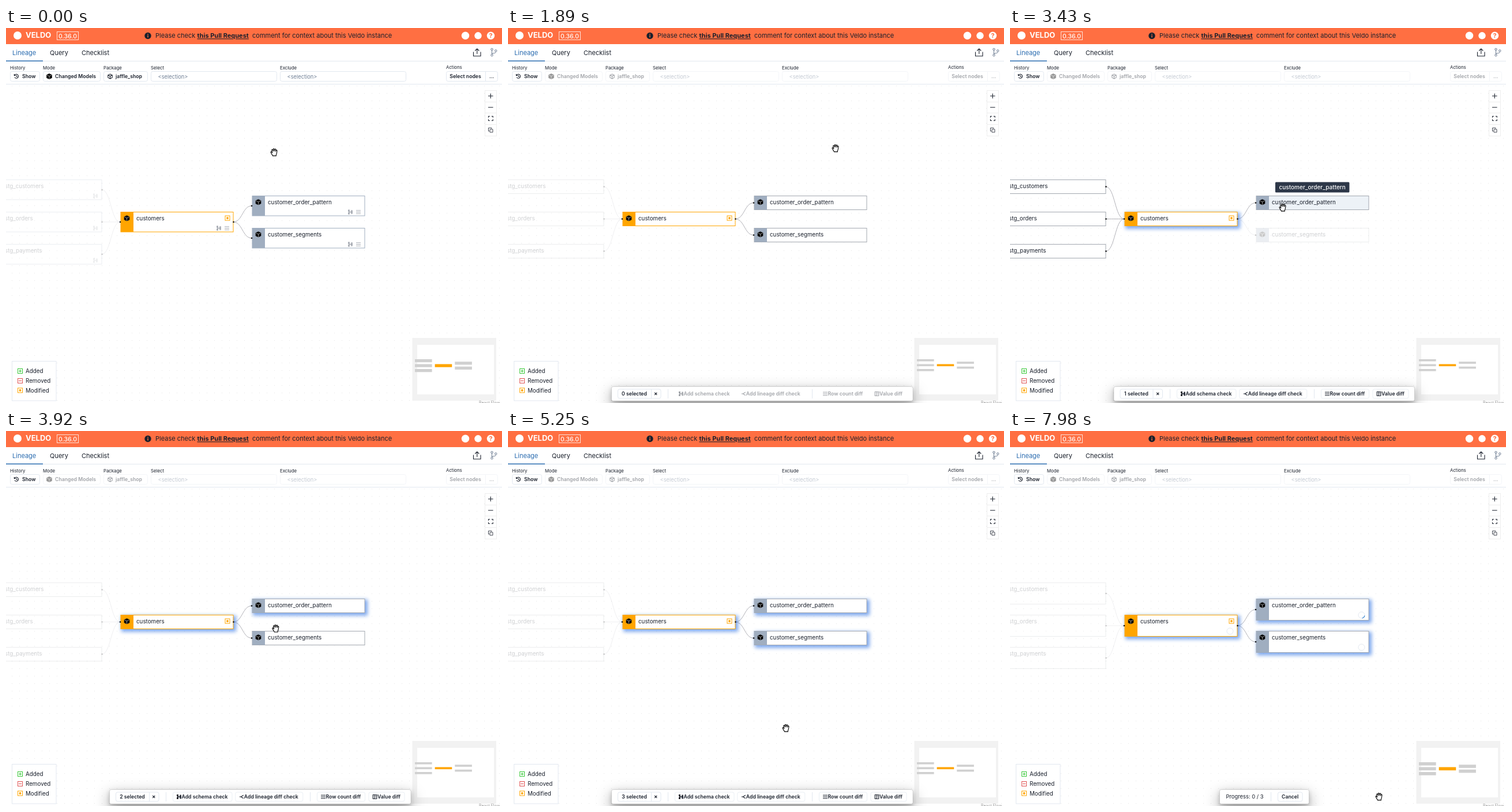
Animation, 860 px wide and 651 px high, one loop 8000 ms. Source, as an HTML page:

```html
<!DOCTYPE html>
<html lang="en">
<head>
<meta charset="utf-8">
<title>Lineage</title>
<style>
html, body { margin: 0; width: 100%; height: 100%; overflow: hidden; background: #fff; }
svg { display: block; width: 860px; height: 651px; }
text { font: 9.8px Inter, "Open Sans", sans-serif; fill: #1a202c; white-space: pre; }
.head { font-size: 11px; }
.bold { font-weight: 700; }
.label { font-size: 7.8px; }
.btn { font-size: 8.7px; font-weight: 600; }
.hint { font-size: 9.3px; fill: #718096; }
.tip { font-size: 10.05px; font-weight: 500; fill: #fff; }
.mid { text-anchor: middle; }
.box { fill: #fff; stroke: #e2e8f0; }
.line { fill: none; stroke: #1a202c; stroke-width: 1.1; }
.thin { fill: none; stroke: #e2e8f0; }
</style>
</head>
<body>
<svg viewBox="0 0 860 651">
  <defs>
    <pattern id="dots" width="13" height="13" patternUnits="userSpaceOnUse" x="4" y="3">
      <circle cx="6.5" cy="6.5" r=".5" fill="#dcdcdc"/>
    </pattern>
    <g id="cube">
      <path d="M0-5 4.8-2.7V2.7L0 5-4.8 2.7V-2.7z"/>
      <path d="M-4.2-2.3 0-.3 4.2-2.3M0-.3V4.6" fill="none" stroke="#fff" stroke-opacity=".75" stroke-width=".8"/>
    </g>
    <g id="schema"><path d="M-2.5-4V4M-2.5 0H3M1-2.5H4M1 2.5H4" fill="none" stroke="currentColor" stroke-width="1.3"/><path d="M-4-4h3v3h-3zM-4 1h3v3h-3zM1-1.5h3v3H1z" fill="currentColor"/></g>
    <g id="rows"><path d="M-4-2.8H4M-4 0H4M-4 2.8H4" fill="none" stroke="currentColor"/></g>
    <g id="fork"><path d="M-3.5 0H-1L3.5-2.8M-1 0 3.5 2.8" fill="none" stroke="currentColor" stroke-width="1.1"/></g>
    <g id="grid"><path d="M-3.5-3.5h7v7h-7zM-1-3.5v7M.5-1.5h2M.5 1h2" fill="none" stroke="currentColor"/></g>
    <g id="mark" fill="none" stroke="currentColor"><rect x="-4" y="-4" width="8" height="8"/></g>
  </defs>
  <rect y="97" width="860" height="554" fill="url(#dots)"/>
  <g id="flow"></g>

  <rect class="box" x="10.5" y="578.5" width="76.5" height="68.5"/>
  <g color="#38c838"><use href="#mark" x="24.5" y="595.5"/><path d="M22 595.5h5M24.5 593v5" stroke="currentColor"/></g>
  <g color="#e05252"><use href="#mark" x="24.5" y="612.5"/><path d="M22 612.5h5" stroke="currentColor"/></g>
  <g color="#ffa500"><use href="#mark" x="24.5" y="629"/><circle cx="24.5" cy="629" r="1.9" fill="currentColor"/></g>
  <text x="34" y="599">Added</text><text x="34" y="616">Removed</text><text x="34" y="633">Modified</text>

  <rect x="704.5" y="538" width="145.5" height="109" fill="#f2f2f2"/>
  <rect x="713" y="550" width="133" height="86" fill="#fff"/>
  <g id="map"></g>
  <rect x="818" y="647" width="42" height="4" fill="#fff"/>
  <text x="820" y="653" style="font-size:7px;fill:#999">React Flow</text>

  <g stroke="#eee"><rect x="830.5" y="108.5" width="20" height="79" fill="#fff"/><path d="M831 128.5h19M831 147.5h19M831 167.5h19"/></g>
  <g class="line" stroke-width="1.4">
    <path d="M836 118h8.6M840.3 113.7v8.6M836 137.8h8.6"/>
    <path d="M836.5 155.5v-2.3h2.5M841.8 153.2h2.5v2.3M844.3 158.5v2.3h-2.5M839 160.8h-2.5v-2.3"/>
    <path d="M839 176h5v5h-5zM838 179h-1.5v-5.5h5.5V175" stroke-width=".8"/>
  </g>

  <rect width="860" height="28" fill="#ff6f42"/>
  <circle cx="20" cy="13" r="7" fill="#fff"/>
  <text class="bold" x="34" y="17.3" style="font-size:13px;fill:#fff">VELDO</text>
  <rect x="88.5" y="6.5" width="37" height="14" fill="none" stroke="#fff" stroke-opacity=".8"/>
  <text class="mid" x="107" y="17.5" style="font-size:10.5px;fill:#fff;font-weight:500">0.36.0</text>
  <circle cx="246" cy="13.5" r="5.7" fill="#1a202c"/>
  <path d="M246 12.5v4M246 10v1.4" stroke="#ff6f42" stroke-width="1.4"/>
  <text class="head" x="259" y="17.3">Please check</text>
  <text class="head bold" x="331.5" y="17.3" text-decoration="underline">this Pull Request</text>
  <text class="head" x="427" y="17.3">comment for context about this Veldo instance</text>
  <g fill="#fff"><circle cx="796.5" cy="13.3" r="6.7"/><circle cx="818.5" cy="13.3" r="6.2"/><circle cx="840.5" cy="13.3" r="6.7"/></g>
  <text class="mid bold" x="840.5" y="17.3" style="fill:#ff6f42;font-size:11px">?</text>

  <rect y="28" width="860" height="69.5" fill="#fff"/>
  <path class="thin" d="M0 57.5H860M0 97.5H860"/>
  <path d="M0 57.3H64" stroke="#2b6cb0" stroke-width="1.5"/>
  <text class="head" x="11" y="46.6" style="fill:#2b6cb0">Lineage</text>
  <text class="head" x="76" y="46.6">Query</text>
  <text class="head" x="131" y="46.6">Checklist</text>
  <path class="line" d="M810.5 41.5v7.2h12.5v-7.2M816.8 45V36.5M813.3 39.5l3.5-3.5 3.5 3.5"/>
  <g fill="none" stroke="#64748b"><path d="M842.5 38.5v7M849.3 41.5c0 3-6 1.5-6.5 4"/><circle cx="842.5" cy="37" r="1.7"/><circle cx="842.5" cy="47.3" r="1.7"/><circle cx="849.3" cy="39.5" r="1.7"/></g>

  <g class="label">
    <text class="label" x="7" y="71.5">History</text><text class="label" x="64" y="71.5">Mode</text>
    <text class="label" x="169" y="71.5">Package</text><text class="label" x="251" y="71.5">Select</text>
    <text class="label" x="475" y="71.5">Exclude</text><text class="label" x="763" y="71">Actions</text>
  </g>
  <rect class="box" x="7.5" y="75.5" width="51" height="17" rx="3"/>
  <path class="line" d="M15 82a3.5 3.5 0 1 1 0 3.5M14.3 80v2.4h2.4M18.3 82v2l1.5 1" stroke-width=".9"/>
  <text class="btn" x="28" y="87">Show</text>
  <g id="tools">
    <g class="box"><rect x="64.5" y="75.5" width="99" height="17" rx="3"/><rect x="169.5" y="75.5" width="76" height="17" rx="3"/><rect x="251.5" y="75.5" width="218" height="17" rx="3"/><rect x="475.5" y="75.5" width="218" height="17" rx="3"/><rect x="763.5" y="75.5" width="89" height="17" rx="3"/></g>
    <rect id="pick" x="764" y="76" width="67" height="16" rx="3" fill="#edf2f7"/>
    <path class="thin" d="M831.5 75.5v17"/>
    <use href="#cube" x="75" y="84"/>
    <path class="line" d="M180.5 80l3.7 1.8v4.2l-3.7 2-3.7-2v-4.2zM176.8 81.8l3.7 1.8 3.7-1.8M180.5 83.6V88" stroke-width=".9"/>
    <text class="btn" x="85" y="87">Changed Models</text>
    <text class="btn" x="190" y="87">jaffle_shop</text>
    <text class="hint" x="263.5" y="87.5">&lt;selection&gt;</text>
    <text class="hint" x="487.5" y="87.5">&lt;selection&gt;</text>
    <text class="btn" x="769.3" y="87">Select nodes</text>
    <text class="btn" x="838" y="87">...</text>
  </g>
  <g id="bar"></g>
  <g id="tip"></g>
  <path id="cursor" fill="#fff" stroke="#000" stroke-width="1.1" stroke-linejoin="round"/>
</svg>
<script>
const LOOP = 8000, STEP = 70, SELECT = 1330, RUN = 7350, SPIN = 7980;
const $ = id => document.getElementById(id);

// name, left, top, accent colour, time of the selecting click, tooltip width
const nodes = [
  ['stg_customers', -29, 263.5], ['stg_orders', -29, 319.5], ['stg_payments', -29, 375.5],
  ['customers', 199, 319.5, '#ffa500', 2800, 61],
  ['customer_order_pattern', 427, 291.5, '#a0aec0', 3710, 128.5],
  ['customer_segments', 427, 347.5, '#a0aec0', 4620, 110]
].map(([name, x, y, color, click = Infinity, tip]) => ({ name, x, y, color, click, tip }));
const [, , , root, ...leaves] = nodes;
const W = 195;

// time, x, y of the pointer
const path = [
  [0, 465, 216], [840, 754, 113], [1190, 797, 88], [1400, 797, 88], [1680, 745, 103],
  [1890, 568, 209], [2520, 311, 340], [2870, 311, 340], [3290, 473, 312], [3710, 473, 312],
  [4060, 465, 360], [4690, 465, 360], [5250, 482, 516], [6090, 598, 637], [6300, 636, 640],
  [6580, 669, 642], [7000, 669, 642], [7140, 625, 621], [7210, 640, 635], [LOOP, 640, 635]
];

const HAND = 'M-2.6 5.5C-4 3-6 .8-6-.4c0-1 1.2-1.1 2 0l.8 1L-4.3-3.6c-.4-1.5 1.3-2 1.9-.6l.8 2-.3-3.4c0-1.3 1.8-1.3 2 0l.3 3.2.7-2.9c.4-1.2 2-.9 1.9.4l-.4 3 .8-1.6c.7-1 1.9-.4 1.6.8C4.4 0 4.6 2.6 3.4 4v1.9h-6z';
const POINT = 'M-2 6C-3.5 3.8-6 1.5-5.6.4c.4-.8 1.5-.4 2.6.8V-5.3c0-1.4 1.8-1.4 1.8 0v3.6c.2-.9 1.7-.9 1.8.2.4-.7 1.7-.6 1.7.5.5-.6 1.7-.3 1.7.8C4.2 2.6 4 4 3.2 6z';

// smooth curve through the points that rests where the motion stops or turns
function slope(i, k) {
  const a = path[i - 1], b = path[i], c = path[i + 1];
  if (!a || !c || (b[k] - a[k]) * (c[k] - b[k]) <= 0) return 0;
  return (c[k] - a[k]) / (c[0] - a[0]);
}
function along(t, k) {
  const i = path.findIndex((p, n) => t < path[n + 1][0]);
  const a = path[i], b = path[i + 1], d = b[0] - a[0], u = (t - a[0]) / d, v = 1 - u;
  return v * v * (1 + 2 * u) * a[k] + u * u * (3 - 2 * u) * b[k]
    + d * u * v * (v * slope(i, k) - u * slope(i + 1, k));
}

const rect = (x, y, w, h, attrs) => `<rect x="${x}" y="${y}" width="${w}" height="${h}" ${attrs}/>`;
const text = (x, y, s, cls = '') => `<text x="${x}" y="${y}" class="${cls}">${s}</text>`;
const icon = (id, x, y) => `<use href="#${id}" x="${x}" y="${y}"/>`;
const blur = (px, alpha, rgb = '0,0,0') => `fill="rgba(${rgb},${alpha})" style="filter:blur(${px}px)"`;

function drawNode(n, s) {
  const { x, y, color } = n, h = s.h, hover = s.hover === n, right = x + W;
  const shown = color ? !s.hover || s.hover === root || hover || n === root || s.t >= n.click : s.hover;
  let out = `<g opacity="${shown ? 1 : .2}">`;
  if (s.t >= n.click) {
    out += hover ? rect(x + 1, y + 1.5, W + 1, h + 1, blur(2, .35))
                 : rect(x + 1, y + 1, W + 4, h + 4, blur(3, .6, '40,110,225'));
  }
  const border = n === root ? color : s.t < SELECT ? '#a0aec0' : '#a3a8b0';
  out += rect(x, y, W, h, `fill="${hover ? '#edf2f7' : '#fff'}" stroke="${border}"`);
  if (color) out += rect(x, y, 22, h, `fill="${color}"`) + icon('cube', x + 10.5, y + 10.7);
  out += text(x + 27, y + 14.6, n.name);
  if (n === root) {
    out += `<g color="#ffa500">${icon('mark', 384, 330)}<circle cx="384" cy="330" r="1.9" fill="currentColor"/></g>`;
  }
  if (s.t < SELECT) {
    out += '<g color="#a9adb5">' + (color
      ? icon('schema', right - 25, y + 28) + icon('rows', right - 11, y + 28)
      : icon('schema', right - 11, y + 28)) + '</g>';
  }
  if (s.t >= RUN && color) {
    const cx = right - 12.5, cy = y + 28;
    out += `<circle cx="${cx}" cy="${cy}" r="5.5" class="thin"/>`;
    if (s.t >= SPIN && n === leaves[0]) {
      out += `<path d="M${cx + 5.4} ${cy + 1}A5.5 5.5 0 0 1 ${cx + 1} ${cy + 5.4}" fill="none" stroke="#3182ce" stroke-width="1.3"/>`;
    }
  }
  const dot = px => `<circle cx="${px}" cy="${y + h / 2}" r="1.3" fill="#111"/>`;
  if (color) out += dot(x - 1);
  if (!leaves.includes(n)) out += dot(right + .5);
  return out + '</g>';
}

function drawEdge(a, b, s) {
  const x1 = a.x + W, x2 = b.x - 1, m = (x1 + x2) / 2, y1 = a.y + s.h / 2, y2 = b.y + s.h / 2;
  const on = b === root ? s.hover : !s.hover || s.hover === root || s.hover === b;
  return `<path d="M${x1} ${y1}C${m} ${y1} ${m} ${y2} ${x2} ${y2}" fill="none" stroke="#b1b1b7" opacity="${on ? 1 : .2}"/>`;
}

function panel(x, w) {
  return rect(x, 632, w, 25, `rx="3" ${blur(13, .4)}`) + rect(x, 625, w, 25, `rx="3" ${blur(3.3, .2)}`)
    + rect(x, 622.5, w, 25, 'rx="3" fill="#fff" stroke="rgba(0,0,0,.12)"');
}
const frame = (x, w, attrs = 'class="box"') => rect(x, 627, w, 16, `rx="3" ${attrs}`);
const split = (x, y = 627) => `<path class="thin" d="M${x} ${y}v16"/>`;

function drawBar(s) {
  if (s.t < SELECT) return '';
  if (s.t >= RUN) {
    return panel(363.5, 155) + `<text x="374.5" y="638" style="font-size:9.4px">Progress: 0 / 3</text>`
      + split(452.5) + frame(464.5, 42.5) + text(485.7, 638, 'Cancel', 'btn mid');
  }
  const count = nodes.filter(n => s.t >= n.click).length, inset = count === 1 ? .5 : 0;
  const button = (x, w, id, label, hot) => (count ? frame(x, w, hot ? 'fill="#e9eff6"' : 'class="box" stroke-opacity=".7"') : '')
    + icon(id, x + 10.5, 635) + text(x + 15, 638, label, 'btn');
  const rowHot = s.y > 626 && s.x > 540 && s.x < 640;
  return panel(179.5 + inset, 522.5 - 2 * inset) + frame(190.5 + inset, 74.5 - 2 * inset) + split(248.5 - inset)
    + text(219, 638, count + ' selected', 'btn mid')
    + '<path class="line" d="M254.2 633l4 4M258.2 633l-4 4"/>' + split(277.5) + split(527.5)
    + `<g color="#1a202c" opacity="${count ? 1 : .4}">`
    + button(289.5, 102.5, 'schema', 'Add schema check')
    + button(397.8, 117, 'fork', 'Add lineage diff check')
    + button(539.5, 83, 'rows', 'Row count diff', rowHot)
    + button(629, 62, 'grid', 'Value diff') + '</g>';
}

function drawTip({ hover: n, t }) {
  if (!n || !n.tip || t > n.click + STEP) return '';
  const out = t >= n.click, cx = n.x + W / 2 - .3, cy = n.y - 15;
  return `<g opacity="${out ? .25 : 1}" transform="translate(${cx} ${cy}) scale(${out ? .92 : 1})">`
    + rect(-n.tip / 2, -9, n.tip, 18, 'rx="1.5" fill="#2d3748"') + text(0, 3.7, n.name, 'tip mid') + '</g>';
}

const last = {};
function put(id, html) {
  if (last[id] !== html) $(id).innerHTML = last[id] = html;
}

function draw(now) {
  const t = Math.floor(now % LOOP / STEP) * STEP;
  const s = { t, x: along(t, 1), y: along(t, 2), h: t < SELECT ? 34.5 : t < RUN ? 24 : 37 };
  s.hover = nodes.find(n => s.x > n.x && s.x < n.x + W && s.y > n.y && s.y < n.y + s.h);

  put('flow', nodes.slice(0, 3).map(n => drawEdge(n, root, s)).join('')
    + leaves.map(n => drawEdge(root, n, s)).join('') + nodes.map(n => drawNode(n, s)).join(''));
  put('map', nodes.map(n => rect(709 + (n.x + 29) * .152, 575 + (n.y - 263.5) * .152, 29.6, s.h * .152,
    `fill="${n === root ? '#ffa500' : '#d0d0d0'}"`)).join(''));
  put('bar', drawBar(s));
  put('tip', drawTip(s));

  const onPick = s.y < 98 && s.x > 763;
  $('pick').setAttribute('opacity', onPick ? 1 : 0);
  $('tools').setAttribute('opacity', t < SELECT ? 1 : .4);
  $('cursor').setAttribute('d', onPick || s.y > 625 && t < RUN ? POINT : HAND);
  $('cursor').setAttribute('transform', `translate(${s.x} ${s.y})`);
}

let start;
function tick(now) {
  start ??= now;
  draw(now - start);
  requestAnimationFrame(tick);
}
draw(0);
requestAnimationFrame(tick);
</script>
</body>
</html>
```
